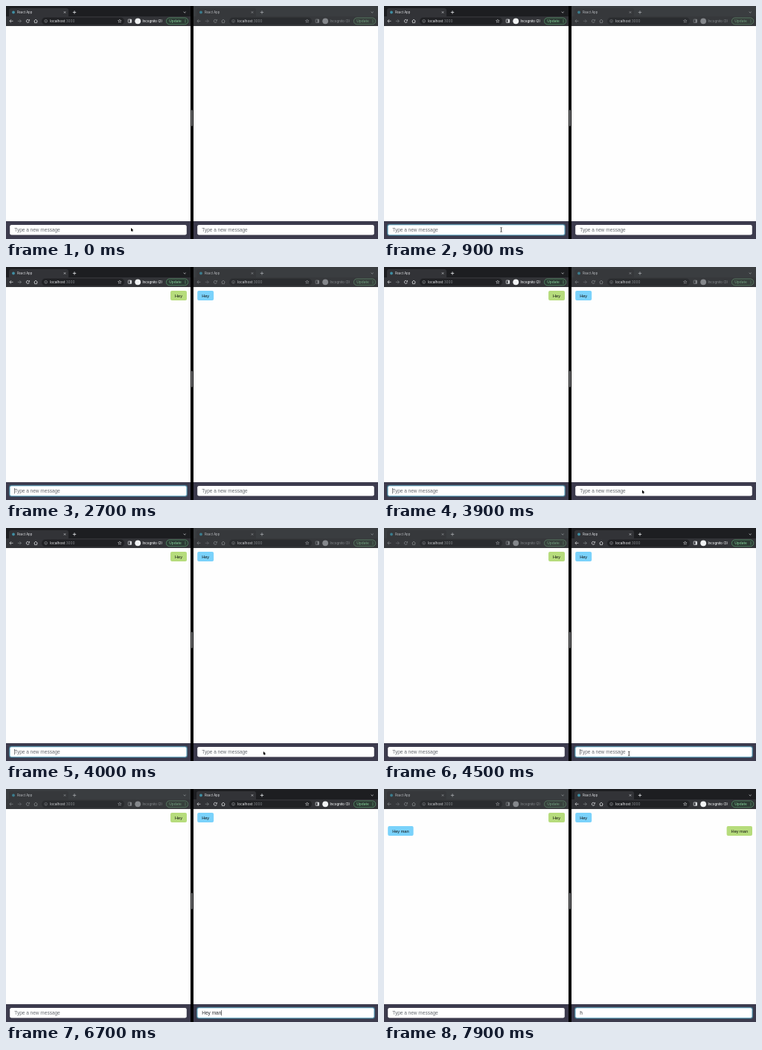
An HTML page with a canvas for the animation above (8 s loop, 500 by 314 pixels).

```html
<!DOCTYPE html>
<html lang="en">
<head>
<meta charset="utf-8">
<title>Chat</title>
<style>
html, body { margin: 0; width: 100%; height: 100%; overflow: hidden; background: #000; }
canvas { display: block; width: 500px; height: 314px; }
</style>
</head>
<body>
<canvas id="stage"></canvas>
<script>
const W = 500, H = 314, LOOP = 8000;
const canvas = document.getElementById('stage');
const ctx = canvas.getContext('2d');
const dpr = window.devicePixelRatio || 1;
canvas.width = W * dpr;
canvas.height = H * dpr;

const UI = 'Inter, Roboto, sans-serif';
const PAGE = '"Liberation Sans", Arial, sans-serif';
const PLACEHOLDER = 'Type a new message';
const BLINK = 500;
const SWAP = 4400;

// Each entry: time, field text. The caret restarts its blink at every entry.
const leftField = [[400, ''], [1200, 'H'], [1800, 'He'], [2000, 'Hey'], [2600, '']];
const rightField = [[SWAP, ''], [5100, 'H'], [5300, 'He'], [5400, 'Hey'], [6200, 'Hey '],
  [6300, 'Hey m'], [6400, 'Hey ma'], [6500, 'Hey man'], [6800, ''], [7400, 'h']];
const messages = [
  { at: 2600, from: 'left', text: 'Hey', y: 32 },
  { at: 6800, from: 'right', text: 'Hey man', y: 50 }
];
// Pointer path: time, x, y
const path = [[3100, 157, 301], [3300, 196, 297], [3500, 268, 294], [3700, 342, 298],
  [3800, 354, 301], [3900, 347, 300.5], [4000, 346, 301], [4300, 329, 303]];

const clamp = v => Math.max(0, Math.min(1, v));
const ease = v => v * v * (3 - 2 * v);
const lerp = (a, b, k) => a + (b - a) * k;

function text(str, x, y, size, color, family = UI, weight = 400) {
  ctx.font = `${weight} ${size}px ${family}`;
  ctx.fillStyle = color;
  ctx.fillText(str, x, y);
  return ctx.measureText(str).width;
}

function box(x, y, w, h, r, fill, stroke, lw = 0.7) {
  ctx.beginPath();
  ctx.roundRect(x, y, w, h, r);
  if (fill) { ctx.fillStyle = fill; ctx.fill(); }
  if (stroke) { ctx.strokeStyle = stroke; ctx.lineWidth = lw; ctx.stroke(); }
}

function line(points, color, lw = 0.8) {
  ctx.beginPath();
  points.forEach(([x, y], i) => i ? ctx.lineTo(x, y) : ctx.moveTo(x, y));
  ctx.strokeStyle = color;
  ctx.lineWidth = lw;
  ctx.stroke();
}

function arc(x, y, r, color, from = 0, to = Math.PI * 2, lw = 0.6) {
  ctx.beginPath();
  ctx.arc(x, y, r, from, to);
  ctx.strokeStyle = color;
  ctx.lineWidth = lw;
  ctx.stroke();
}

function dot(x, y, r, color) {
  ctx.beginPath();
  ctx.arc(x, y, r, 0, Math.PI * 2);
  ctx.fillStyle = color;
  ctx.fill();
}

function star(x, y, r, color) {
  ctx.beginPath();
  for (let i = 0; i < 10; i++) {
    const a = -Math.PI / 2 + i * Math.PI / 5, d = i % 2 ? r * 0.45 : r;
    ctx.lineTo(x + d * Math.cos(a), y + d * Math.sin(a));
  }
  ctx.closePath();
  ctx.strokeStyle = color;
  ctx.lineWidth = 0.5;
  ctx.stroke();
}

function drawTabs(active) {
  const bar = active ? '#323337' : '#36383b';
  const ink = active ? '#e4e6e9' : '#a3a6aa';
  ctx.fillStyle = active ? '#1d1e21' : '#3a3d40';
  ctx.fillRect(0, 0, 248, 14);
  box(4, 3, 80, 14, [3, 3, 0, 0], bar);
  ctx.fillStyle = bar;
  ctx.fillRect(0, 14, 248, 13);
  dot(10, 8.5, 1.9, active ? '#3f8ea3' : '#3b7c8e');
  text('React App', 15, 10, 4.15, active ? '#dfe1e5' : '#b9bcc0');
  line([[77.8, 7.3], [80.2, 9.7]], ink, 0.6);
  line([[80.2, 7.3], [77.8, 9.7]], ink, 0.6);
  line([[89.8, 8.5], [94.2, 8.5]], ink);
  line([[92, 6.3], [92, 10.7]], ink);
  line([[238.7, 7.8], [240.2, 9.2], [241.7, 7.8]], ink, 0.7);
}

function drawToolbar(active, count) {
  const ink = active ? '#e4e6e9' : '#85888c';
  const dim = active ? '#85888c' : '#6a6d71';
  line([[9.5, 20.3], [5, 20.3]], ink, 0.7);
  line([[7, 18.2], [4.9, 20.3], [7, 22.4]], ink, 0.7);
  line([[15.8, 20.3], [20.3, 20.3]], dim, 0.7);
  line([[18.3, 18.2], [20.4, 20.3], [18.3, 22.4]], dim, 0.7);
  arc(29.3, 20.3, 2, ink, 0.3, 5.3, 0.75);
  line([[31.5, 18], [31.5, 19.7], [29.8, 19.7]], ink, 0.7);
  line([[37.5, 20.4], [40, 18], [42.5, 20.4]], ink, 0.7);
  line([[38.4, 20], [38.4, 22.6], [41.6, 22.6], [41.6, 20]], ink, 0.7);

  box(48, 15.5, 111, 9.6, 4.8, active ? '#202124' : '#2a2c2f');
  arc(53.6, 20.3, 1.9, active ? '#b5b8bc' : '#8f9296', 0, 7, 0.5);
  line([[53.6, 19.9], [53.6, 21.4]], '#a5a8ac', 0.5);
  const w = text('localhost', 59, 22, 4.75, active ? '#f0f1f3' : '#d6d8db');
  text(':3000', 59 + w, 22, 4.75, '#85898e');
  star(152.8, 20.3, 2.4, active ? '#d8dadd' : '#a0a3a7');

  box(164.2, 18, 4.4, 4.4, 0.5, null, ink, 0.7);
  ctx.fillStyle = ink;
  ctx.fillRect(166.6, 18, 2, 4.4);
  dot(177.2, 20.3, 3.9, active ? '#f1f3f4' : '#85888c');
  text(`Incognito (${count})`, 183.4, 22, 4.4, active ? '#f1f3f4' : '#7d8084', UI, 500);

  const green = active ? '#81c995' : '#6f9a7c';
  box(215.4, 15.9, 29.4, 8.9, 4.4, active ? '#2b3a33' : '#37403c', active ? '#5f9f73' : '#628a6e', 0.7);
  text('Update', 219.3, 22, 4.75, green, UI, 500);
  for (let i = -1; i < 2; i++) dot(241, 20.3 + i * 1.6, 0.5, green);
}

function fieldState(steps, t) {
  let now = null;
  for (const s of steps) if (t >= s[0]) now = s;
  if (!now) return { text: '', caret: false };
  return { text: now[1], caret: Math.floor((t - now[0]) / BLINK) % 2 === 0 };
}

function drawField(state, glow) {
  ctx.fillStyle = '#3c3b4d';
  ctx.fillRect(0, 290, 248, 24);
  if (glow > 0) {
    ctx.globalAlpha = glow;
    box(3.9, 293.7, 240.2, 16, 3, 'rgba(62,128,156,.6)');
    ctx.globalAlpha = 1;
  }
  box(5.2, 295, 237.6, 13.4, 2.2, '#fff');
  if (glow > 0) {
    ctx.globalAlpha = glow;
    box(5.2, 295, 237.6, 13.4, 2.2, null, '#83bfd6', 0.8);
    ctx.globalAlpha = 1;
  }
  const w = state.text ? text(state.text, 11.3, 304, 6.5, '#2b2e33', PAGE)
    : (text(PLACEHOLDER, 11.3, 304, 6.5, '#676b71', PAGE), 0);
  if (state.caret) {
    ctx.fillStyle = '#25272b';
    ctx.fillRect(11.2 + w, 298, 0.6, 7.4);
  }
}

function drawBubble(msg, own) {
  ctx.font = `500 5.6px ${PAGE}`;
  const w = ctx.measureText(msg.text).width + 12;
  const x = own ? 243 - w : 5.2;
  box(x, msg.y, w, 13, 2, own ? '#b6dc7c' : '#7ad2fb');
  text(msg.text, x + 6, msg.y + 8.5, 5.6, '#111', PAGE, 500);
}

function drawWindow(side, x, t, count, steps, focusAt, blurAt) {
  const active = t >= focusAt && t < blurAt;
  const clicked = t >= steps[0][0] && t < blurAt;
  const state = fieldState(steps, t);
  if (!clicked) state.caret = false;
  ctx.save();
  ctx.translate(x, 0);
  ctx.beginPath();
  ctx.rect(0, 0, 248, H);
  ctx.clip();
  ctx.fillStyle = '#fefefe';
  ctx.fillRect(0, 0, 248, H);
  drawTabs(active);
  drawToolbar(active, count);
  for (const m of messages) if (t >= m.at) drawBubble(m, m.from === side);
  drawField(state, clicked ? clamp((t - steps[0][0] + 50) / 150) : 0);
  ctx.restore();
}

function drawArrow(x, y) {
  ctx.beginPath();
  [[0, 0], [0, 4.7], [1.1, 3.7], [1.8, 5.3], [2.6, 4.9], [1.9, 3.4], [3.3, 3.3]]
    .forEach(([dx, dy]) => ctx.lineTo(x + dx, y + dy));
  ctx.closePath();
  ctx.strokeStyle = '#fff';
  ctx.lineWidth = 0.9;
  ctx.stroke();
  ctx.fillStyle = '#000';
  ctx.fill();
}

function drawBeam(x, y) {
  line([[x, y - 2.8], [x, y + 2.8]], '#222', 0.8);
  for (const s of [-1, 1]) line([[x - 1.2, y + s * 3], [x, y + s * 2.5], [x + 1.2, y + s * 3]], '#222', 0.7);
}

function drawPointer(t) {
  if (t < 400) {
    const k = ease(clamp((t - 50) / 300));
    drawArrow(lerp(168, 157, k), lerp(299, 300, k));
  } else if (t < 1200) {
    drawBeam(157.5, 301.5);
  } else if (t >= path[0][0] && t < SWAP) {
    let i = 0;
    while (i < path.length - 2 && t >= path[i + 1][0]) i++;
    const [a, b] = [path[i], path[i + 1]];
    const k = clamp((t - a[0]) / (b[0] - a[0]));
    drawArrow(lerp(a[1], b[1], k), lerp(a[2], b[2], k));
  } else if (t >= SWAP && t < 5100) {
    drawBeam(329.3, 304);
  }
}

function draw(t) {
  ctx.setTransform(dpr, 0, 0, dpr, 0, 0);
  ctx.fillStyle = '#000';
  ctx.fillRect(0, 0, W, H);
  drawWindow('left', 0, t, 2, leftField, 0, SWAP);
  drawWindow('right', 252, t, 3, rightField, SWAP, LOOP);
  box(248.9, 140, 2, 22, 1, '#77787a');
  drawPointer(t);
}

const start = performance.now();
function tick() {
  draw((performance.now() - start) % LOOP);
  requestAnimationFrame(tick);
}
tick();
</script>
</body>
</html>
```
